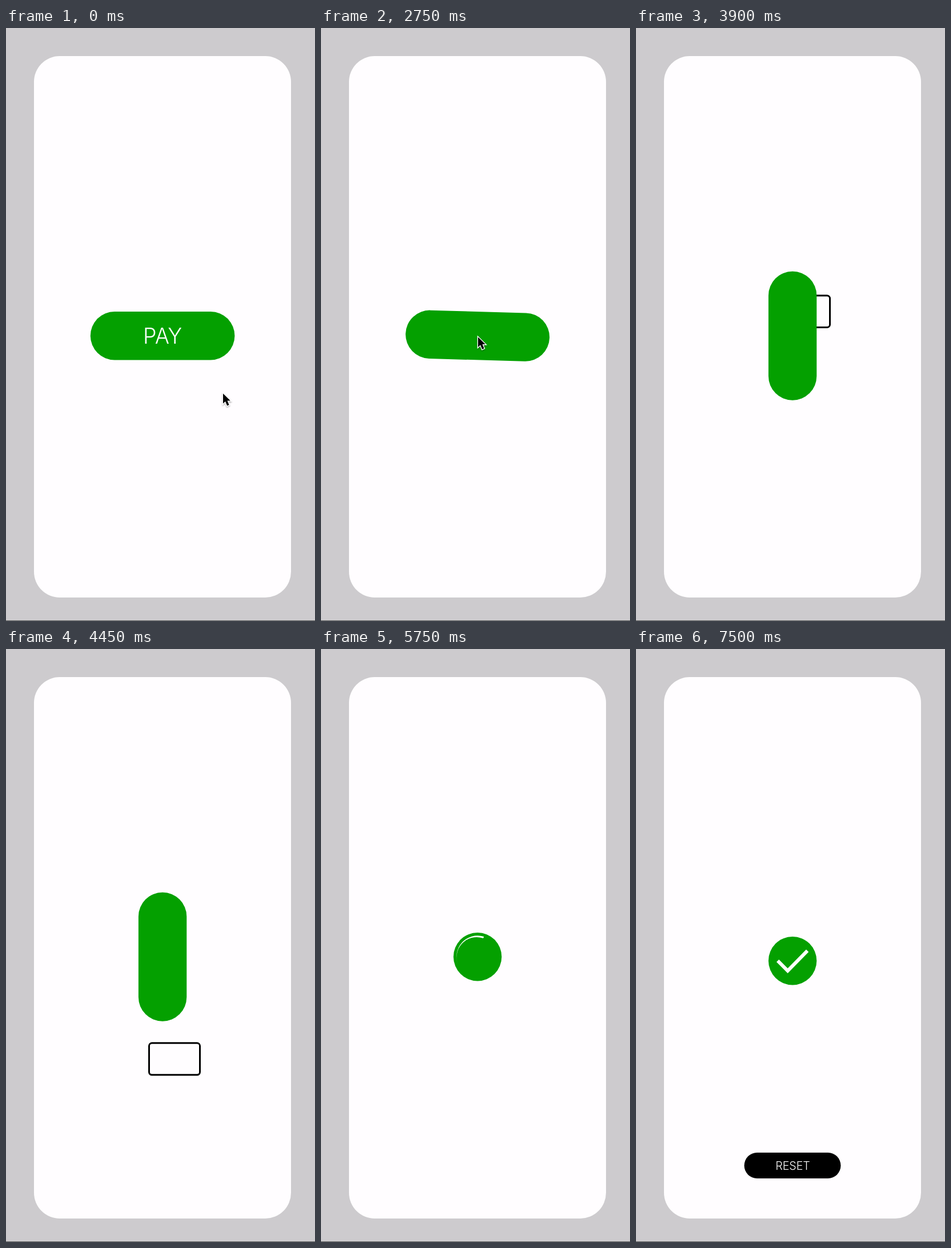
An HTML page for the animation above (8000 ms loop, 541 px wide and 1035 px high).

```html
<!DOCTYPE html>
<html lang="en">
<head>
<meta charset="utf-8">
<title>Pay button</title>
<style>
  html, body { margin: 0; width: 100%; height: 100%; overflow: hidden; background: #cdcbce; }
  svg { display: block; width: 541px; height: 1035px; }
  text { font-family: Inter, "Open Sans", sans-serif; font-weight: 300; fill: #fff; text-anchor: middle; }
</style>
</head>
<body>
<svg viewBox="0 0 541 1035">
  <defs>
    <linearGradient id="tail" gradientUnits="userSpaceOnUse" x1="-25" y1="-28" x2="8" y2="-36">
      <stop stop-color="#fff" stop-opacity=".2"/>
      <stop offset="1" stop-color="#fff"/>
    </linearGradient>
    <filter id="shadow" x="-50%" y="-50%" width="200%" height="200%">
      <feDropShadow dx="0" dy="1.5" stdDeviation="1.2" flood-opacity=".35"/>
    </filter>
  </defs>
  <rect width="541" height="1035" fill="#cdcbce"/>
  <rect y="1034" width="541" height="1" fill="#555"/>
  <rect x="49" y="49" width="450" height="945" rx="45" fill="#fffdff"/>
  <rect id="card" x="250.5" y="364.5" width="89" height="55.5" rx="5" fill="#fffdff" stroke="#000" stroke-width="3"/>
  <g id="button">
    <rect id="pill" fill="#04a000"/>
    <text id="pay" y="14" font-size="37.5">PAY</text>
    <path id="spinner" fill="url(#tail)" d="M37 0A37 37 0 0 0 -23.8 -28.3A35.2 35.2 0 0 1 33.8 0Q35.4 1.4 37 0Z"/>
    <path id="check" fill="none" stroke="#fff" stroke-width="6" d="M-26 0L-8.5 17.5L26 -17.5"/>
  </g>
  <g id="reset">
    <rect x="189.5" y="879" width="169" height="45" rx="22.5"/>
    <text x="274.5" y="909" font-size="19.6">RESET</text>
  </g>
  <path id="cursor" d="M0 0V17.5L4 13.8L7.2 21.2L10.6 19.7L7.5 12.6H12.8Z" stroke="#fff" stroke-width="2.6"
    paint-order="stroke" filter="url(#shadow)"/>
</svg>
<script>
const LOOP = 8000;
const el = id => document.getElementById(id);
const set = (id, attrs) => { for (const k in attrs) el(id).setAttribute(k, attrs[k]); };
const mix = (a, b, p) => a + (b - a) * p;
const smooth = (t, from, to) => {
  const p = Math.min(1, Math.max(0, (t - from) / (to - from)));
  return p * p * (3 - 2 * p);
};
const bezier = (a, b, c, p) => mix(mix(a, b, p), mix(b, c, p), p);
const during = (t, from, to) => t >= from && t < to ? 1 : 0;

// Gentle spring: mass 1, stiffness 100, damping 15
function spring(t, start) {
  const s = (t - start) / 1000;
  if (s <= 0) return 0;
  if (s > 0.85) return 1;
  const w = Math.sqrt(100 - 7.5 ** 2);
  return 1 - Math.exp(-7.5 * s) * (Math.cos(w * s) + 7.5 / w * Math.sin(w * s));
}

function draw(t) {
  const turn = spring(t, 2731), swipe = spring(t, 3796), shrink = spring(t, 4628);
  const finish = smooth(t, 6700, 7250);

  const width = 84.4;
  const length = mix(mix(252.6, 225, turn), width, shrink);
  set("pill", { x: -length / 2, y: -width / 2, width: length, height: width,
    rx: Math.min(length, width) / 2, transform: `rotate(${90 * turn})` });

  const hover = t < 2650 ? 1 + 0.077 * smooth(t, 1520, 1750) : 1;
  const nudge = 0.5 * during(t, 4550, 5400);
  set("button", { transform: `translate(${274.1 + nudge} ${537.2 + 7 * finish}) scale(${hover})` });
  set("pay", { opacity: during(t, 0, 2650) });

  set("card", { opacity: during(t, 2650, 4550),
    transform: `translate(${475 * (1 - turn)} ${320 * swipe})` });

  set("spinner", { opacity: during(t, 5450, 6250),
    transform: `rotate(${-35 + 360 * spring(t, 5475)})` });
  set("check", { opacity: smooth(t, 6250, 6500) });
  set("reset", { opacity: finish });

  const move = smooth(t, 930, 1750);
  set("cursor", { opacity: during(t, 0, 3100),
    transform: `translate(${bezier(380, 319, 275, move)} ${bezier(638, 647, 539.5, move)})` });
}

function tick() {
  draw(performance.now() % LOOP);
  requestAnimationFrame(tick);
}
tick();
</script>
</body>
</html>
```
